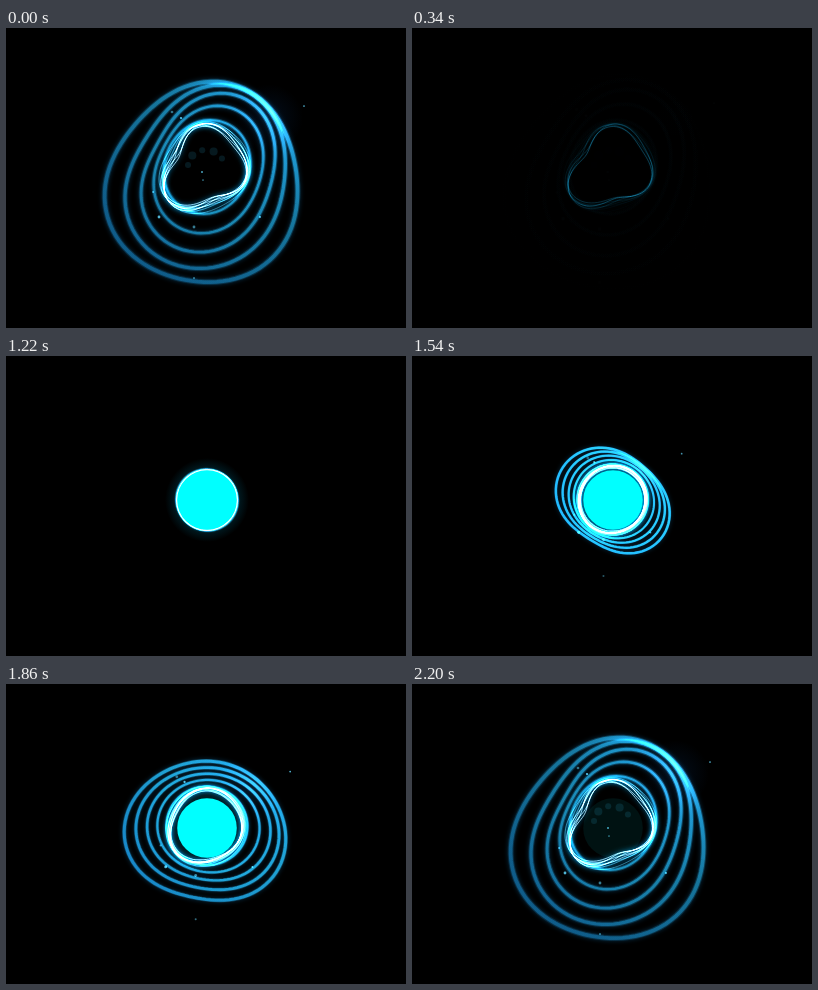
An HTML page with a canvas that plays this animation: 400 by 300 pixels, repeating every 2.22 s.

```html
<!DOCTYPE html>
<html lang="en">
<head>
<meta charset="utf-8">
<title>Fingerprint energy loop</title>
<style>
  html, body { margin: 0; width: 100%; height: 100%; overflow: hidden; background: #000; }
  .stage { position: relative; width: 400px; height: 300px; overflow: hidden; }
  canvas, svg { position: absolute; left: 0; top: 0; display: block; }
  #print path {
    fill: none; stroke: url(#tint); stroke-width: 1.9; stroke-linecap: round;
    stroke-dasharray: 1 2;
  }
</style>
</head>
<body>
<div class="stage">
  <svg id="print" width="400" height="300" viewBox="0 0 400 300">
    <defs>
      <linearGradient id="tint" gradientUnits="userSpaceOnUse" x1="200" y1="113" x2="200" y2="174">
        <stop offset="0" stop-color="#00f2cc"/>
        <stop offset=".45" stop-color="#08c4de"/>
        <stop offset="1" stop-color="#0a8cff"/>
      </linearGradient>
    </defs>
    <path pathLength="1" d="M171 135A31 31 0 0 1 230.5 152"/>
    <path pathLength="1" d="M170.2 141Q169.4 146 170.2 150"/>
    <path pathLength="1" d="M186 172.5C178 164 174.5 154 176 144A25 25 0 0 1 224 139"/>
    <path pathLength="1" d="M224.5 144Q225 148 222.5 153Q220 159 223 164"/>
    <path pathLength="1" d="M194.5 173.5C186 165 181 156 182 146A18.4 18.4 0 0 1 218.6 145V148A6.1 6.1 0 0 1 206.5 148V146A6.1 6.1 0 0 0 194.3 146C194 158 202 167 214 169.5"/>
    <path pathLength="1" d="M205.5 173.5C196 168 187 158 188 146A12.3 12.3 0 0 1 212.5 146V148"/>
    <path pathLength="1" d="M200.5 147C200 155 206 162 214 161.5"/>
  </svg>
  <canvas id="view" width="400" height="300"></canvas>
</div>
<script>
const LOOP = 2220, BIRTH = 1200, GROWN = 2200;
const RINGS = 5, STRANDS = 8;
const SPARKS = [[175, 90], [166, 84], [298, 78], [188, 250], [153, 189], [147, 164],
  [254, 189], [188, 199], [196, 144], [197, 152]];

const ctx = document.getElementById('view').getContext('2d');
const print = document.getElementById('print');
const lines = [...print.querySelectorAll('path')];

const clamp = x => Math.max(0, Math.min(1, x));
const ramp = (t, a, b) => clamp((t - a) / (b - a));
const lerp = (a, b, u) => a + (b - a) * u;
const hump = u => Math.sin(Math.PI * u);

// Closed curve: a circle bent by an oval and a three-cornered wave
function blob({ x, y, r, oval, axis, tri, tip }) {
  ctx.beginPath();
  for (let i = 0; i < 96; i++) {
    const a = i / 96 * 2 * Math.PI;
    const q = r * (1 + oval * Math.cos(2 * (a - axis)) + tri * Math.cos(3 * (a - tip)));
    ctx.lineTo(x + q * Math.cos(a), y + q * Math.sin(a));
  }
  ctx.closePath();
}

// Rings run from d = 0 (inner) to d = 1 (outer)
function ring(d, age, after) {
  const mid = hump(d) * age;
  return {
    x: 201 + 4 * mid - 3 * d * age ** 3,
    y: 144 + 13 * d * age ** 3 - 5 * (1 - d) * age ** 2 - 2 * mid,
    r: 30 + age * lerp(15, 68, d) + 8 * d * after,
    oval: .95 * d * age * (1 - age) ** 2 + age ** 3 * (.03 + .03 * (1 - d) + .1 * hump(d)),
    axis: .7 - 1.85 * age ** 3,
    tri: .04 * d * age,
    tip: .77
  };
}

// Strands run from s = 0 (innermost) to s = 1
function strand(s, k, age, after) {
  const sway = 1.2 * Math.min(1, .4 + age * 3);
  const turn = .1 * Math.sin(k * 2.4) * age + .14 * after;
  return {
    x: 201 - 2 * age + sway * Math.sin(k * 1.9),
    y: 144 - 4 * age ** 2 + sway * Math.cos(k * 2.7),
    r: 29.8 + age * (8 + 6 * s),
    oval: .12 * age ** 2 * (1 - .4 * s),
    axis: 2.36 + turn,
    tri: .16 * age ** 3 * (1 - .7 * s),
    tip: .33 + turn
  };
}

function stroke(style, width, alpha) {
  ctx.strokeStyle = style;
  ctx.lineWidth = width;
  ctx.globalAlpha = clamp(alpha);
  ctx.stroke();
}

function dot(x, y, r, color, alpha) {
  ctx.globalAlpha = alpha;
  ctx.fillStyle = color;
  ctx.beginPath();
  ctx.arc(x, y, r, 0, 7);
  ctx.fill();
}

function glow(x, y, r, rgb, alpha) {
  const g = ctx.createRadialGradient(x, y, 0, x, y, r);
  g.addColorStop(0, `rgba(${rgb},${alpha})`);
  g.addColorStop(1, `rgba(${rgb},0)`);
  dot(x, y, r, g, 1);
}

// Light gathers at the upper right and falls off along each ring
function sheen(d, age) {
  const x = 201 + 62 * age, y = 144 - 56 * age;
  const far = lerp(58, 21 + 9 * (1 - d), age);
  const g = ctx.createRadialGradient(x, y, 0, x, y, 40 + 150 * age);
  g.addColorStop(0, '#40b8ff');
  g.addColorStop(.25, `hsl(198 72% ${lerp(far, 46, .7)}%)`);
  g.addColorStop(.6, `hsl(195 72% ${far + 5 * age}%)`);
  g.addColorStop(1, `hsl(202 78% ${far}%)`);
  return g;
}

function drawRings(age, after) {
  const dim = (1 - after) ** 2.4 * ramp(age, 0, .15);
  glow(201 + 62 * age, 144 - 54 * age, 34 * age, '20,110,220', .12 * dim * age);
  ctx.shadowColor = '#0f6ea8';
  for (let k = 0; k < RINGS; k++) {
    const d = k / (RINGS - 1);
    const style = sheen(d, age);
    const width = lerp(1.7, 2 + 1.8 * d, age);
    const alpha = dim * (1 - d * after);
    blob(ring(d, age, after));
    ctx.shadowBlur = 4 * dim;
    stroke(style, width + 2 * age, .35 * alpha);
    ctx.shadowBlur = 0;
    stroke(style, width, lerp(.9, .6, age) * alpha);
  }
}

function drawStrands(age, after) {
  const lit = lerp(.25, 1, ramp(age, 0, .25));
  const tone = `hsl(194 ${lerp(100, 75, after)}% ${lerp(93, 50, after)}%)`;
  ctx.shadowColor = '#00aaff';
  for (let k = 0; k < STRANDS; k++) {
    const s = k / (STRANDS - 1);
    blob(strand(s, k, age, after));
    ctx.shadowBlur = 5 * lit * (1 - after);
    stroke(s < .6 ? tone : `hsl(194 85% ${lerp(68, 45, after)}%)`,
      lerp(1.2, 1, age), lit * lerp(.8, .7 - .25 * s, age) * (1 - after) ** (.8 + 1.4 * s));
  }
  ctx.shadowBlur = 0;
}

function drawSparks(age, after) {
  const spread = lerp(.5, 1, age ** .8) + .05 * after;
  const lit = ramp(age, .1, .4) * (1 - after) ** 2.4;
  SPARKS.forEach(([x, y], i) => dot(200 + (x - 200) * spread, 146 + (y - 146) * spread,
    1.1 + .3 * Math.sin(i * 2), '#5ccdf0', lit * (.7 + .2 * Math.cos(i * 3))));
  for (let i = 0; i < 5; i++) {
    const a = 3.2 + i * .65;
    dot(200 + 18 * Math.cos(a), 138 + 16 * Math.sin(a), 3 + i % 2, '#1f7f9c', .2 * lit);
  }
}

function drawDisc(t) {
  const leave = 1 - ramp(t, 1880, 2225);
  const halo = ramp(t, 1120, BIRTH) * (1 - ramp(t, 1880, 2150));
  ctx.globalCompositeOperation = 'destination-over';
  glow(201, 144, 42, '0,130,165', .8 * halo);
  ctx.globalCompositeOperation = 'source-over';
  dot(201, 144, 29.8, '#0ff', ramp(t, 740, 1060) * leave);
}

function drawPrint(t) {
  print.style.opacity = ramp(t, 370, 470) * (1 - ramp(t, 900, 1070));
  lines.forEach((line, i) => {
    const u = ramp(t, 370 + i * 8, 560 + i * 8);
    line.style.strokeDashoffset = 1 - u * u * (3 - 2 * u);
  });
}

function draw(t) {
  const age = t < 600 ? 1 : ramp(t, BIRTH, GROWN);
  const after = t < 600 ? ramp(t, 0, 420) : 0;
  ctx.clearRect(0, 0, 400, 300);
  drawPrint(t);
  if (age > 0 && after < 1) {
    ctx.globalCompositeOperation = 'lighter';
    drawRings(age, after);
    drawStrands(age, after);
    drawSparks(age, after);
  }
  drawDisc(t);
}

let start;
function tick(now) {
  start ??= now;
  draw((now - start) % LOOP);
  requestAnimationFrame(tick);
}
draw(0);
requestAnimationFrame(tick);
</script>
</body>
</html>
```
